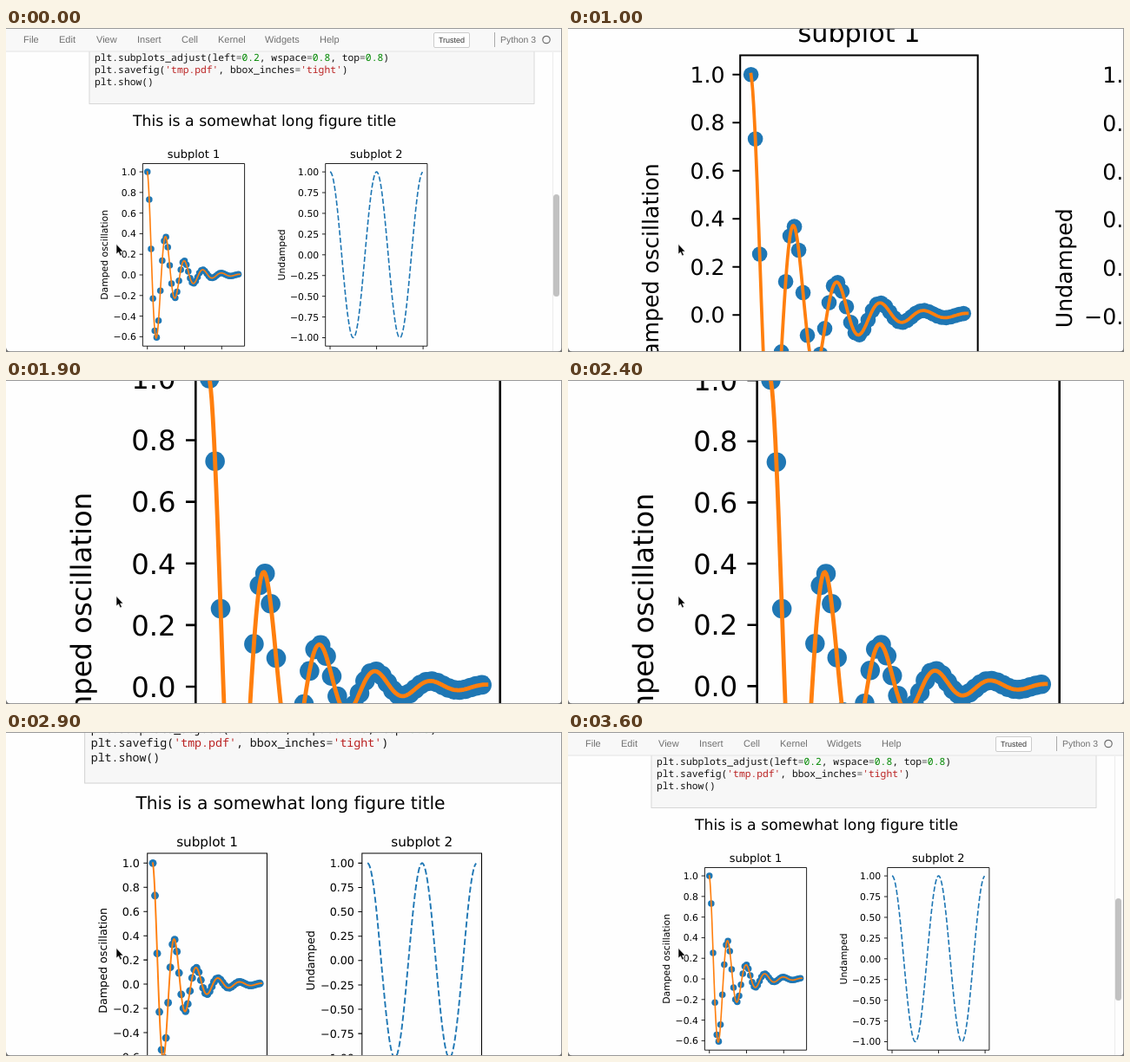
An HTML page for the animation above (3700 ms loop, 640x374 px).

```html
<!DOCTYPE html>
<html lang="en">
<head>
<meta charset="utf-8">
<title>Notebook zoom</title>
<style>
  html, body { margin: 0; width: 100%; height: 100%; overflow: hidden; background: #fefefe; }
  svg { display: block; width: 100vw; height: 100vh; }
  text { text-rendering: geometricPrecision; white-space: pre; font-variant-ligatures: none; }
  .ui { font-family: "Liberation Sans", Arial, sans-serif; fill: #707070; }
  .code { font: 11.3px "Noto Sans Mono", "DejaVu Sans Mono", monospace; fill: #111; }
  .num { fill: #080; }
  .str { fill: #ba2121; }
  .op { fill: #555; }
  .plot { font-family: "DejaVu Sans", sans-serif; fill: #000; }
  .axis { fill: none; stroke: #000; stroke-width: .87; }
</style>
</head>
<body>
<svg viewBox="0 0 640 374" preserveAspectRatio="none">
  <rect width="640" height="374" fill="#fefefe"/>
  <g id="page">
    <rect x="96" y="-20" width="512" height="107.5" fill="#f7f7f7" stroke="#d4d4d4" stroke-width=".9"/>
    <g class="code">
      <text x="102" y="38">plt.subplots_adjust(left<tspan class="op">=</tspan><tspan class="num">0.2</tspan>, wspace<tspan class="op">=</tspan><tspan class="num">0.8</tspan>, top<tspan class="op">=</tspan><tspan class="num">0.8</tspan>)</text>
      <text x="102" y="52">plt.savefig(<tspan class="str">'tmp.pdf'</tspan>, bbox_inches<tspan class="op">=</tspan><tspan class="str">'tight'</tspan>)</text>
      <text x="102" y="66">plt.show()</text>
    </g>
    <g id="figure" class="plot"></g>
    <g id="header" class="ui" font-size="11">
      <rect width="640" height="27" fill="#f8f8f8"/>
      <path d="M0 27H640" stroke="#e4e4e4"/>
      <rect x="492.5" y="5.5" width="41" height="17" rx="1.5" fill="#fefefe" stroke="#ccc"/>
      <text x="513" y="17" font-size="9" text-anchor="middle" fill="#333">Trusted</text>
      <path d="M562.5 5V22" stroke="#aaa"/>
      <text x="569" y="17" font-size="10.4">Python 3</text>
      <circle cx="622" cy="13.5" r="4.2" fill="none" stroke="#707070" stroke-width="1.2"/>
    </g>
    <path d="M629.5 28V374" stroke="#ececec"/>
    <rect x="630" y="192" width="7" height="118" rx="3.5" fill="#c1c1c1"/>
  </g>
  <path d="M0 .5H640M639.5 0V374M0 373.5H640" fill="none" stroke="#999"/>
  <path d="M0 374V369Q1 373 5 374ZM640 374V369Q639 373 635 374Z" fill="#777"/>
  <path d="M127 249.5V261L129.6 258.7L131.5 263L133.4 262.1L131.6 258H135Z" fill="#050505" stroke="#fefefe" stroke-width=".6"/>
</svg>
<script>
const NS = 'http://www.w3.org/2000/svg';
const byId = id => document.getElementById(id);

function add(parent, tag, attrs, content) {
  const el = document.createElementNS(NS, tag);
  for (const key in attrs) el.setAttribute(key, attrs[key]);
  if (content) el.textContent = content;
  parent.append(el);
  return el;
}

const menu = { File: 20, Edit: 61, View: 104, Insert: 151, Cell: 202, Kernel: 244, Widgets: 298, Help: 361 };
for (const name in menu) add(byId('header'), 'text', { x: menu[name], y: 17 }, name);

// Lengths in the figure are in points, as a plotting library would set them.
const PT = 1.08, TOP = 156.5, BOTTOM = 367.2, AXES_WIDTH = 117.2, MARGIN = 5.33;
const figure = byId('figure');

function label(content, x, y, size, anchor = 'middle', extra = {}) {
  add(figure, 'text', { x, y, 'font-size': size * PT, 'text-anchor': anchor, ...extra }, content);
}

function axes({ left, title, yLabel, yLabelX, xMax, xStep, yZero, yUnit, yFrom, yStep, digits }) {
  const toX = v => left + MARGIN + v * (AXES_WIDTH - 2 * MARGIN) / xMax;
  const toY = v => yZero - v * yUnit;
  const mid = (TOP + BOTTOM) / 2;
  let ticks = '';
  for (let i = 0; i < 3; i++) ticks += `M${toX(i * xStep)} ${BOTTOM}v${3.5 * PT}`;
  for (let v = yFrom; v < 1.01; v += yStep) {
    const y = toY(v);
    const isZero = Math.abs(v) < 1e-6;
    ticks += `M${left} ${y}h${-3.5 * PT}`;
    label((v < 0 && !isZero ? '\u2212' : '') + Math.abs(v).toFixed(digits), left - 7 * PT, y + 3.94, 10, 'end');
  }
  label(title, left + AXES_WIDTH / 2, TOP - 6 * PT, 12);
  label(yLabel, yLabelX, mid, 10, 'middle', { transform: `rotate(-90 ${yLabelX} ${mid})` });
  const frame = () => add(figure, 'path', {
    class: 'axis', d: `${ticks}M${left} ${TOP}h${AXES_WIDTH}V${BOTTOM}h${-AXES_WIDTH}Z`
  });
  return { toX, toY, frame };
}

function curve({ toX, toY }, fn, end, step, attrs) {
  const points = [];
  for (let x = 0; x < end - step / 2; x += step) points.push(`${toX(x).toFixed(2)},${toY(fn(x)).toFixed(2)}`);
  add(figure, 'polyline', { points: points.join(' '), fill: 'none', 'stroke-width': 1.5 * PT, ...attrs });
}

const BLUE = '#1f77b4', ORANGE = '#ff7f0e';
const wave = x => Math.cos(2 * Math.PI * x);
const damped = x => wave(x) * Math.exp(-x);

label('This is a somewhat long figure title', 297.6, 113.4, 16);

const first = axes({
  left: 157.4, title: 'subplot 1', yLabel: 'Damped oscillation', yLabelX: 117.2, xMax: 4.98, xStep: 2,
  yZero: 285, yUnit: 118.95, yFrom: -0.6, yStep: 0.2, digits: 1
});
for (let i = 0; i < 50; i++) {
  add(figure, 'circle', { cx: first.toX(i / 10), cy: first.toY(damped(i / 10)), r: 3.5 * PT, fill: BLUE });
}
curve(first, damped, 5, 0.02, { stroke: ORANGE, 'stroke-linejoin': 'round', 'stroke-linecap': 'square' });
first.frame();

const second = axes({
  left: 367.7, title: 'subplot 2', yLabel: 'Undamped', yLabelX: 321, xMax: 1.99, xStep: 1,
  yZero: 261.8, yUnit: 95.7, yFrom: -1, yStep: 0.25, digits: 2
});
curve(second, wave, 2, 0.01, { stroke: BLUE, 'stroke-dasharray': '6 2.6' });
second.frame();

const LOOP = 3700, STEP = 100, MAX_ZOOM = 2.99;
const CENTER = { x: 126.8, y: 250.3 };

function ease(t, from, to) {
  const u = Math.min(1, Math.max(0, (t - from) / (to - from)));
  return u ** 3 * (10 - 15 * u + 6 * u * u);
}

function render(time) {
  const t = Math.floor(time % LOOP / STEP) * STEP;
  const zoom = 1 + (MAX_ZOOM - 1) * (ease(t, 537, 1318) - ease(t, 2319, 3078));
  byId('page').setAttribute('transform',
    `translate(${CENTER.x} ${CENTER.y}) scale(${zoom}) translate(${-CENTER.x} ${-CENTER.y})`);
}

const start = performance.now();
function tick() {
  render(performance.now() - start);
  requestAnimationFrame(tick);
}
tick();
</script>
</body>
</html>
```
